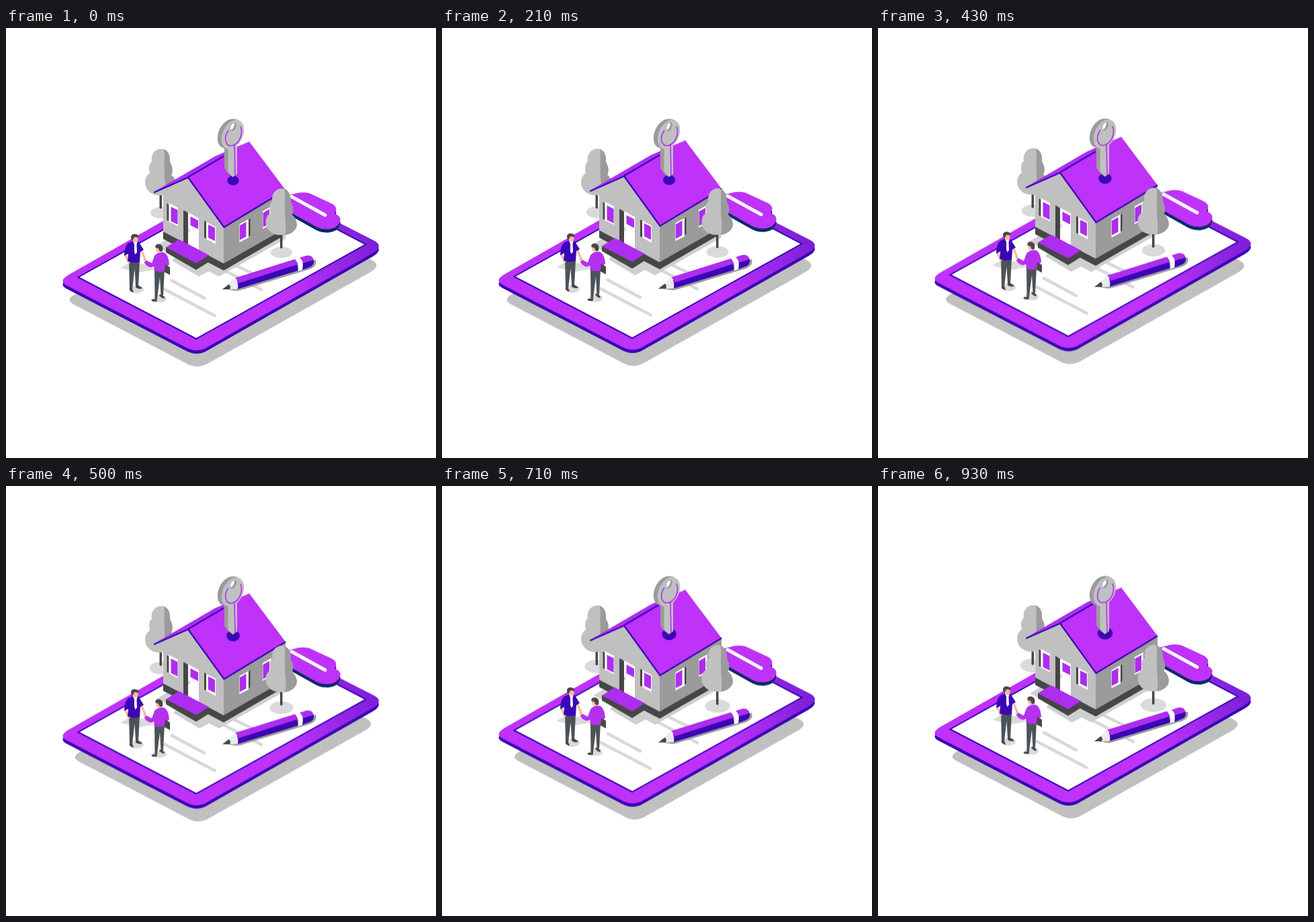
An HTML page without scripts for the animation above (1000 ms loop, 640x640 px).

```html
<!DOCTYPE html>
<html lang="en">
<head>
<meta charset="utf-8">
<title>House on a clipboard</title>
<style>
html, body { margin: 0; width: 100%; height: 100%; overflow: hidden; background: #fff; }
svg { display: block; width: 100%; height: 100%; }
.move {
  transform-origin: var(--o, 0 0);
  animation: rise 1s cubic-bezier(.364, 0, .636, 1) infinite;
}
@keyframes rise { to { transform: translateY(var(--dy, 0px)) scale(var(--s, 1)); } }
.board { --dy: -9.1px; }
.house { --dy: -18.2px; }
.tree { --dy: -2.6px; }
.key { --dy: -1.5px; }
.man { --dy: -8.5px; }
.ground { --s: .929; --o: 322.5px 375px; }
.cast { --dy: -17px; --s: .96; --o: 324px 340px; }
.spot { --dy: -8px; --s: 1.2; }
.spot.left { --o: 231px 275px; }
.spot.right { --o: 410px 334px; }
.hole { --dy: -8px; --s: 1.28; --o: 338px 227px; }
.violet { fill: #be32fa; }
.plum { fill: #ae2df0; }
.blue { fill: #3b06b5; }
.navy { fill: #072a66; }
.light { fill: #c0c0c0; }
.mid { fill: #9b9b9b; }
.dark { fill: #464646; }
.pale { fill: #dadada; }
.white { fill: #fff; }
.skin { fill: #f7b999; }
.slate { fill: #4b5359; }
.line { fill: none; stroke-linecap: round; stroke-linejoin: round; }
</style>
</head>
<body>
<svg viewBox="0 0 640 640">
  <defs>
    <linearGradient id="sheen" gradientUnits="userSpaceOnUse" x1="410" y1="375" x2="535" y2="300">
      <stop offset="0" stop-color="#be32fa"/>
      <stop offset="1" stop-color="#7d20d8"/>
    </linearGradient>
    <path id="slab" d="M92 368L350 221L400 241L546 315.500Q564 324 546 335L298 476Q283 484 267 475L90 383Q78 377 92 368Z"/>
    <path id="clip" d="M412 251L428 247Q445 242 456 248L486 262Q495 268 489 276Q500 281 497 288Q494 298 480 299.500Q470 300 462 296L412 268Z"/>
    <path id="crown" d="M231 180C240 180 245 188 244 200C248 206 249 213 246 219C253 224 255 234 252 239C247 248 236 250 230 249C217 250 207 241 207 230C207 223 210 219 214 216C212 208 213 202 217 199C215 188 222 180 231 180Z"/>
    <clipPath id="shade"><path d="M234 178C238 190 234 200 236 210C234 222 240 235 235 251H260V178Z"/></clipPath>
    <g id="tree">
      <path class="dark" d="M228.500 246h3.500v22q-1.700 2-3.500 0z"/>
      <use href="#crown" class="light"/>
      <use href="#crown" class="mid" clip-path="url(#shade)"/>
    </g>
    <ellipse id="bow" rx="15" ry="23" transform="rotate(25)"/>
  </defs>

  <path class="move ground light" d="M103 396L340 262L540 343Q561 352 543 363L303 498Q285 509 268 499L100 411Q88 404 103 396Z"/>
  <ellipse class="move spot left pale" cx="231" cy="275" rx="16" ry="8.500"/>
  <g class="move tree"><use href="#tree"/></g>

  <g class="move board">
    <use href="#slab" class="blue" y="5"/>
    <use href="#slab" fill="url(#sheen)"/>
    <path class="white" stroke="#3b06b5" stroke-width="2" d="M107.500 371L283 462.500L535.500 322L360 230Z"/>
    <path class="pale" d="M170 357L186 348L208 352L222 359L197 364Z"/>
    <path class="line" stroke="#d8d8d8" stroke-width="4.500" d="M299 347L380 389.500M335 350L372 368M247 376L295 402M236 389L310.500 428"/>
    <use href="#clip" class="navy" y="5"/>
    <use href="#clip" class="violet"/>
    <path class="line" stroke="#fff" stroke-width="5" d="M425 251L475 278.500"/>
  </g>

  <path class="move cast" fill="#cfcfcf" d="M222 325L240 314L416 300L416 314L317 370L302 362L287 370L247 346L254 340Z"/>

  <g class="move house">
    <path class="light" d="M234 240L271 222L324 297V352L234 304Z"/>
    <path class="mid" d="M324 296L416 241V299L324 352Z"/>
    <path class="dark" d="M234 303L324 350.500L412 300V310L324 361L234 314Z"/>
    <!-- gable windows and door -->
    <path class="dark" d="M239.500 261l3 1.500v25l-3-1.500zM295 287l3 1.500v25l-3-1.500zM264 271l7 4v49l-7-4z"/>
    <path class="white" d="M242.500 260.500L256 267.500V295L242.500 288zM298 288.500L312 296V321.500L298 314zM271 274.500L287 283V332L271 323z"/>
    <path class="plum" d="M245.500 266l10 5v21.500l-10-5zM301 292.500l10 5v19.500l-10-5zM274.500 280.500l11.500 6v13l-11.500-6z"/>
    <path class="line" stroke="#bbb" stroke-width="1.500" d="M272.500 299.500v4"/>
    <!-- side windows -->
    <path class="white" d="M347.500 292L361 284.500V312L347.500 319zM382 272.500L395.500 265V292L382 299z"/>
    <path class="plum" d="M348 294l9.500-5.500v22l-9.500 5zM382.500 275l9.500-5.500v22l-9.500 5z"/>
    <path class="dark" d="M361 285l2.500-1.500v25l-2.500 1.500zM395.500 266l2.500-1.500v25l-2.500 1.500z"/>
    <!-- porch -->
    <path class="dark" d="M238 326L283 349L302 338V348L283 360L238 334Z"/>
    <path class="plum" d="M238 326.500L257.500 314.500L302 338L283 350Z"/>
    <!-- roof -->
    <path class="plum" d="M220 244L311 191L362 169L271 222Z"/>
    <path class="violet" d="M271 222L362 169L416 241L324 296Z"/>
    <path class="line" stroke="#3b06b5" stroke-width="2.200" d="M221 244.500L271 222.500L324.500 296.500L415.500 241.500M271 222L323 191.500"/>
  </g>

  <ellipse class="move hole blue" cx="338" cy="227" rx="8.700" ry="7.200" transform-origin="338 227"/>
  <g class="move key">
    <path class="mid" d="M325 174L333 176V216L338 222L331 217L325 209Z"/>
    <use href="#bow" class="mid" x="0" transform="translate(331.500 157.200)"/>
    <use href="#bow" class="mid" transform="translate(334.500 157.200)"/>
    <path class="light" d="M330.500 174L344 170V217.500L337.500 222L330.500 214Z"/>
    <use href="#bow" class="light" transform="translate(337.500 158.500)"/>
    <ellipse class="mid" cx="338" cy="147" rx="4.200" ry="7" transform="rotate(25 338 147)"/>
    <ellipse class="white" cx="336.800" cy="146.500" rx="2.200" ry="5.500" transform="rotate(25 336.800 146.500)"/>
    <path class="line" stroke="#b22ff2" stroke-width="1.600" d="M330.500 153C323 165 327 177 337 175C349 171 353 156 349 147M340 174L341 219"/>
  </g>

  <g class="move board">
    <path class="mid" d="M323 388L341 391Q346 391.500 350 390L452 359Q464 354 461 345L440 350Z"/>
    <path class="blue" d="M344 374L432 346L435 361L345 388.500Z"/>
    <path class="plum" d="M341 372L430 344Q434 347 435 351.500L346 380Q345 375 341 372Z"/>
    <path class="white" d="M430 344L437 342Q444 350 441 360L434.500 362Q437.500 352 430 344Z"/>
    <path class="plum" d="M437 342L446 339Q455 337 458 345L442 350.500Q441 345 437 342Z"/>
    <path class="blue" d="M442 350L458 345Q459 352 454 355L441.500 360Z"/>
    <path fill="#e9ebf2" d="M341 372Q347 380 345 388.500L331 389L332 381Z"/>
    <path class="dark" d="M322 389L331.500 381.500Q335.500 384 333 389Z"/>
  </g>

  <g class="move man">
    <ellipse class="pale" cx="194" cy="389" rx="11" ry="6"/>
    <ellipse class="pale" cx="229" cy="403" rx="10" ry="5.500"/>
    <!-- left man -->
    <path class="slate" d="M183 346H199L197 384H193L191.500 358L188 388H184Z"/>
    <path class="dark" d="M184 386L188 388L190 393Q187 394 184 390ZM193 383H197L203 387Q199 390 193 386Z"/>
    <path class="line" stroke="#f7b999" stroke-width="3.200" d="M177.500 338L183 349M201.500 331L207 344"/>
    <path class="blue" d="M182 320L188 317.500H197L205 330L200 333L199 348Q190 351 181 347L182 336L176 339Q176 325 182 320Z"/>
    <path class="white" d="M189 317L196 317L194.500 322L195 334L192.500 337L191 333V322Z"/>
    <path class="skin" d="M188 311H196.500V317Q193 321 189 317Z"/>
    <path class="dark" d="M186.500 315Q184 307 191 306.500Q198 307 197.500 312L191 311L188.500 316Z"/>
    <!-- right man -->
    <path class="slate" d="M221 359H236L234 398H230.500L229 371L225 403H221.500Z"/>
    <path class="dark" d="M217 404L225 403L224.500 407Q220 408 216.500 406ZM229 396L236 400L235 403Q231 402 228 398Z"/>
    <path class="line" stroke="#f7b999" stroke-width="3" d="M206 345L210 348"/>
    <path class="violet" d="M221 339Q226 333 235 334Q242 337 243 352L236 357V362Q228 364 220.500 361V355Q212 359 205.500 349L209 346L217 350Z" style="fill:#b331ef"/>
    <path class="dark" d="M237 352L244 356V367.500L235.500 363Z"/>
    <path class="skin" d="M223 327H231V333L226 334Q223 332 223 327Z"/>
    <path class="dark" d="M222.500 327Q221 321.500 228 321.500Q235 323 233 332Q230 334.500 228 331L227 328Z"/>
  </g>

  <ellipse class="move spot right pale" cx="410" cy="334" rx="16" ry="8.500"/>
  <g class="move tree"><use href="#tree" x="179.500" y="59"/></g>
</svg>
</body>
</html>
```
